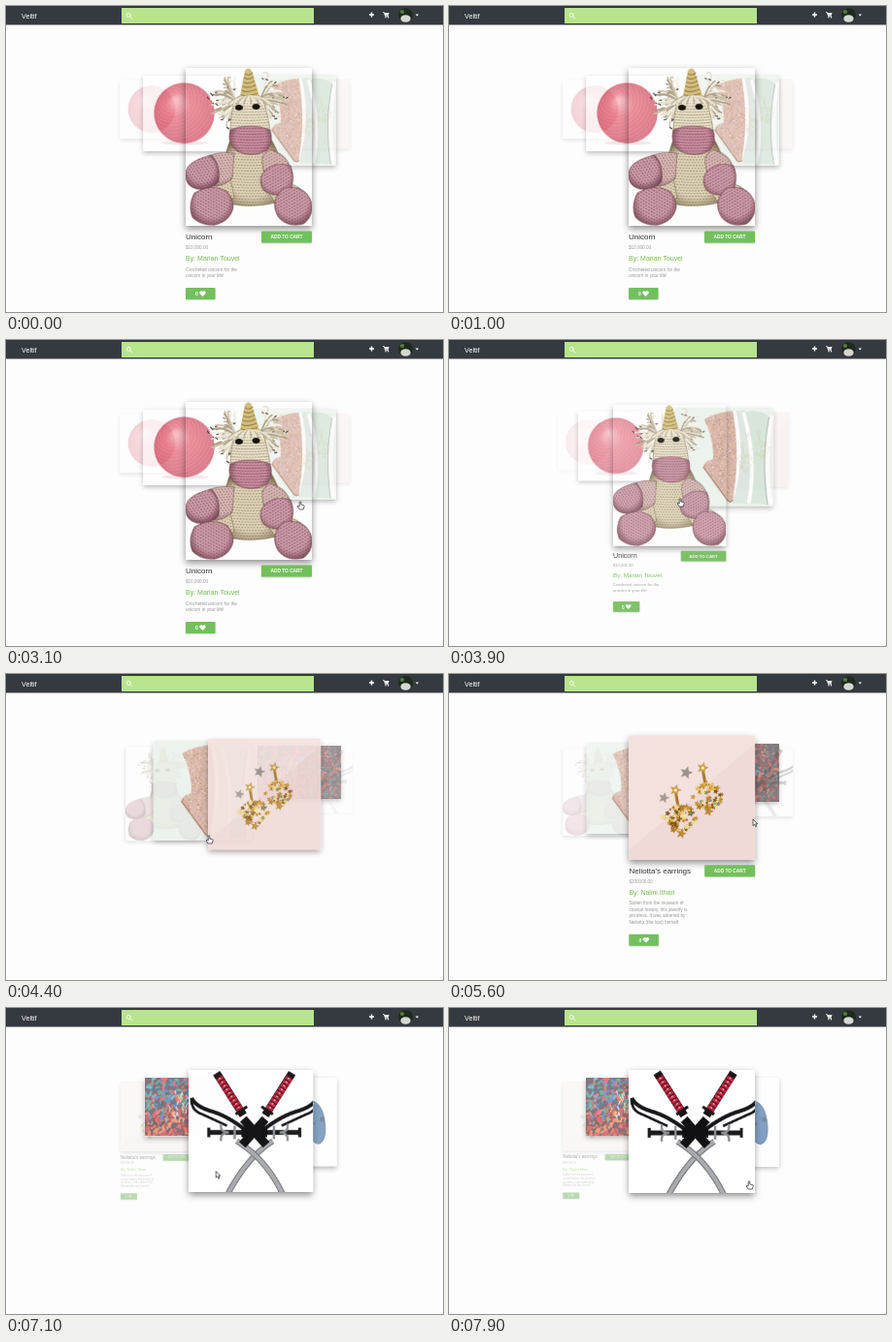
An HTML page with a canvas that plays this animation: 450x316 px, repeating every 8 s.

```html
<!DOCTYPE html>
<html lang="en">
<head>
<meta charset="utf-8">
<title>Shop carousel</title>
<style>
  html, body { margin: 0; width: 100%; height: 100%; overflow: hidden; background: #fdfdfd; }
  canvas { display: block; width: 450px; height: 316px; }
</style>
</head>
<body>
<canvas id="stage" width="450" height="316"></canvas>
<script>
const LOOP = 8000, W = 130, RES = 3;
const FONT = '"Liberation Sans", Arial, sans-serif';
const GREEN = '#72c05c';
const ctx = document.getElementById('stage').getContext('2d');
ctx.imageSmoothingQuality = 'high';

const clamp = (v, a = 0, b = 1) => Math.min(b, Math.max(a, v));
const ramp = (t, a, b) => clamp((t - a) / (b - a));
const smooth = k => k * k * (3 - 2 * k);

function seeded(seed) {
  return () => (seed = (seed * 16807) % 2147483647) / 2147483647;
}

// ---------- drawing helpers ----------
function oval(c, x, y, rx, ry, fill) {
  c.fillStyle = fill;
  c.beginPath();
  c.ellipse(x, y, rx, ry, 0, 0, 7);
  c.fill();
}

function shape(c, d, fill) {
  c.fillStyle = fill;
  c.fill(new Path2D(d));
}

function stroke(c, d, color, width) {
  c.strokeStyle = color;
  c.lineWidth = width;
  c.stroke(new Path2D(d));
}

function text(c, str, x, y, size, color, weight = '') {
  c.font = `${weight} ${size}px ${FONT}`;
  c.fillStyle = color;
  c.fillText(str, x, y);
}

function star(c, x, y, r, fill) {
  c.fillStyle = fill;
  c.beginPath();
  for (let i = 0; i < 10; i++) {
    const a = i * Math.PI / 5 - 1.3, q = i % 2 ? r * 0.45 : r;
    c.lineTo(x + q * Math.cos(a), y + q * Math.sin(a));
  }
  c.fill();
}

// Crocheted part: outline d, lit around (x, y), rows of stitches tilted by rot
function knit(c, d, x, y, r, base, dark, rot = 0) {
  c.save();
  c.clip(new Path2D(d));
  const g = c.createRadialGradient(x, y - r * 0.25, r * 0.1, x, y, r);
  g.addColorStop(0, base);
  g.addColorStop(0.6, base);
  g.addColorStop(1, dark);
  shape(c, d, g);
  c.translate(x, y);
  c.rotate(rot);
  c.setLineDash([1.7, 1.4]);
  c.strokeStyle = dark;
  c.lineWidth = 1;
  c.globalAlpha = 0.65;
  for (let v = -50, n = 0; v < 50; v += 2.9, n++) {
    c.lineDashOffset = n * 1.5;
    c.beginPath();
    c.moveTo(-50, v - 5);
    c.quadraticCurveTo(0, v + 7, 50, v - 5);
    c.stroke();
  }
  c.restore();
  c.globalAlpha = 0.6;
  stroke(c, d, dark, 1);
  c.globalAlpha = 1;
}

// ---------- pictures, in units of a 130 wide card ----------
function ball(c, h) {
  c.fillStyle = '#fff';
  c.fillRect(0, 0, W, h);
  oval(c, 60, 97, 34, 3, '#e8dcdc');
  const g = c.createRadialGradient(46, 36, 3, 59, 54, 44);
  g.addColorStop(0, '#f2939d');
  g.addColorStop(0.35, '#e0435a');
  g.addColorStop(1, '#c4253f');
  oval(c, 59, 54, 43.5, 43.5, g);
  c.save();
  c.beginPath();
  c.arc(59, 54, 43.5, 0, 7);
  c.clip();
  for (let r = 8; r < 90; r += 5) {
    c.strokeStyle = 'rgba(255,215,220,.2)';
    c.lineWidth = 0.8;
    c.beginPath();
    c.arc(42, 34, r, 0, 7);
    c.stroke();
  }
  c.restore();
}

function mane(c, x, y, dir, rnd) {
  c.lineCap = 'round';
  for (let i = 0; i < 85; i++) {
    const a = -1.5 + rnd() * 2.8, l = 12 + rnd() * 16;
    const ex = x + dir * Math.cos(a) * l, ey = y + Math.sin(a) * l;
    const tint = ['#e6decd', '#cbbfa7', '#f5f1e5', '#aa9d86'][i % 4];
    stroke(c, `M${x} ${y}Q${x + dir * l * 0.5} ${ey - 4} ${ex} ${ey}`, tint, 1.6);
    if (i % 5 == 0) stroke(c, `M${ex} ${ey}l${dir * 2} ${1.5 - rnd() * 4}`, '#35312c', 1);
  }
}

function unicorn(c) {
  const rnd = seeded(77);
  const cream = ['#dcd2b3', '#7f6d50'], pink = ['#cb98a5', '#72434f'], blush = ['#d5b5b1', '#7d575a'];
  knit(c, 'M46 74Q39 92 38 112Q36 134 46 140Q66 145 93 139Q104 122 100 102Q95 85 87 72Z', 68, 112, 40, ...cream);
  knit(c, 'M46 113Q28 116 14 124Q20 134 42 140L50 134Z', 36, 124, 24, ...cream, 0.4);
  knit(c, 'M92 116Q112 118 122 128Q112 140 94 142L86 130Z', 102, 126, 24, ...cream, -0.4);
  knit(c, 'M50 88Q32 86 22 92L20 122Q38 124 48 114Z', 35, 102, 25, ...blush, 1);
  knit(c, 'M26 90Q2 96 0 108Q-1 122 12 125Q28 125 34 117Q36 98 26 90Z', 16, 106, 21, ...pink, 0.9);
  knit(c, 'M85 84Q104 88 108 104L88 118Q77 106 79 92Z', 92, 99, 22, ...blush, -0.5);
  knit(c, 'M80 108Q90 96 108 101Q114 116 106 128Q92 135 80 126Q74 116 80 108Z', 93, 114, 22, ...pink, -0.5);
  knit(c, 'M42 127Q27 119 9 129Q2 142 7 154Q16 163 30 162Q46 158 49 144Q49 134 42 127Z', 27, 140, 26, ...pink, 0.5);
  knit(c, 'M101 124Q122 120 129 137Q133 152 121 161Q104 165 95 153Q86 137 101 124Z', 110, 140, 25, ...pink, -0.5);
  mane(c, 52, 36, -1, rnd);
  mane(c, 77, 32, 1, rnd);
  knit(c, 'M51 32Q64 22 78 30Q85 46 87 66Q78 86 62 86Q44 80 46 62Q47 44 51 32Z', 65, 54, 40, '#e8e0c8', '#8d7c5e');
  shape(c, 'M61 3Q65 -2 68 3L76 29Q66 35 56 29Z', '#d2bd7c');
  for (let i = 0; i < 6; i++) {
    stroke(c, `M${61 - i * 0.8} ${6 + i * 4.3}q5 3 ${8 + i * 1.7} -1`, '#917b42', 1);
  }
  for (let i = 0; i < 18; i++) {
    stroke(c, `M66 29q${i * 2 - 17} 1 ${i * 2.6 - 22} ${6 + rnd() * 7}`, i % 3 ? '#efe8d7' : '#bdb199', 1.4);
  }
  knit(c, 'M46 64Q66 56 87 64Q91 78 82 86Q68 93 53 86Q42 77 46 64Z', 67, 74, 24, '#c98d9d', '#7c4a59');
  oval(c, 55, 41, 4, 3, '#17130f');
  oval(c, 72.5, 40, 4, 3, '#17130f');
}

function shoes(c, h) {
  const rnd = seeded(9);
  c.fillStyle = '#e6efe7';
  c.fillRect(0, 0, W, h);
  shape(c, 'M74 4L92 3Q104 62 96 127L66 126Q88 70 74 4Z', '#d3e0d6');
  stroke(c, 'M77 4Q92 66 72 126', '#fdfdfc', 6);
  shape(c, 'M88 8Q105 -2 125 12Q114 70 123 128L94 126Q106 70 88 8Z', '#cbdfd0');
  stroke(c, 'M90 6Q108 68 97 126', '#fcfdfc', 5);
  stroke(c, 'M127 10Q117 70 126 128', '#fcfdfc', 6);
  stroke(c, 'M124 12Q113 70 122 128', '#8ea496', 1.2);
  const wedge = 'M38 15Q58 5 76 4Q86 60 76 122Q72 128 66 118L37 78Q39 70 50 68Q52 44 38 15Z';
  shape(c, wedge, '#cfa08d');
  c.save();
  c.clip(new Path2D(wedge));
  for (let i = 0; i < 600; i++) {
    c.fillStyle = ['#a8705c', '#eccfc2', '#c28c50', '#a98488'][i % 4];
    c.fillRect(36 + rnd() * 50, rnd() * 128, 1.5, 1.5);
  }
  c.restore();
  stroke(c, 'M76 122Q72 128 66 118L37 78', '#96644a', 1.8);
}

function cluster(c, x, y, rnd) {
  const gold = ['#b27c25', '#e3bd63', '#82571b', '#f3dc98', '#c9983a'];
  stroke(c, `M${x - 5} ${y - 28}l3 18`, '#a9772a', 3);
  for (let i = 0; i < 75; i++) {
    const dy = (rnd() - 0.5) * 25, dx = (rnd() - 0.5) * 2 * (20 - Math.abs(dy));
    star(c, x + dx, y + dy, 1.6 + rnd() * 2.4, gold[i % 5]);
    if (i % 8 == 0) oval(c, x + dx, y + dy, 1.3, 1.3, i % 16 ? '#5d9b94' : '#cc6d55');
  }
  star(c, x + 1, y + 16, 5.5, '#b98a38');
  star(c, x - 5, y - 29, 6.5, '#c99d46');
  oval(c, x - 5, y - 29, 1.6, 1.6, '#fff0bc');
}

function earrings(c, h) {
  const rnd = seeded(41);
  c.fillStyle = '#efdad7';
  c.fillRect(0, 0, W, h);
  shape(c, `M0 0H${W}V8L0 ${h - 10}Z`, '#f3e1de');
  star(c, 59, 38, 7, '#9d918b');
  star(c, 36, 64, 6, '#a59993');
  cluster(c, 81, 62, rnd);
  cluster(c, 53, 85, rnd);
}

function painting(c, h) {
  const rnd = seeded(1234);
  const red = ['#c81f2b', '#e8352f', '#8d1420', '#e96a35', '#3a1722'];
  const blue = ['#1f63a8', '#3f9ccb', '#16345c', '#2f7f62', '#d43038'];
  const dusk = ['#4a1a20', '#2c2328', '#8f2627', '#36504f', '#b0482f'];
  c.fillStyle = '#35202a';
  c.fillRect(0, 0, W, h);
  c.lineCap = 'round';
  for (let i = 0; i < 700; i++) {
    const x = rnd() * W, y = rnd() * h, edge = rnd() * 34;
    const tones = x > 66 + edge ? dusk : y + x * 0.3 > 36 + edge ? red : blue;
    stroke(c, `M${x} ${y}l${rnd() * 10 - 5} ${rnd() * 9 - 2}`, tones[Math.floor(rnd() * 5)], 1.5 + rnd() * 3);
  }
  for (let i = 0; i < 26; i++) {
    stroke(c, `M${34 + rnd() * 28} ${18 + rnd() * 42}l${rnd() * 6 - 3} 5`, i % 2 ? '#e6c452' : '#cfe3ea', 1.5);
  }
}

function swordSide(c) {
  c.lineCap = 'butt';
  stroke(c, 'M3 29Q7 38 24 43T60 63', '#17171a', 4);
  stroke(c, 'M3 29Q2 42 14 46L40 58', '#17171a', 2.6);
  stroke(c, 'M20 65H64', '#1a1a1c', 5);
  stroke(c, 'M21 60v10', '#1a1a1c', 3);
  stroke(c, 'M34 56Q32 65 42 65Q32 66 34 74M48 58v14', '#8d8f93', 2.4);
  stroke(c, 'M29 3L57 47', '#1b1416', 8.5);
  stroke(c, 'M31 7L54 42', '#c3273f', 7.5);
  c.setLineDash([1.5, 3]);
  stroke(c, 'M31 7L54 42', '#5d0f20', 7);
  stroke(c, 'M32 8L54 42', '#f1a3ae', 2.2);
  c.setLineDash([]);
  stroke(c, 'M49 46L61 38', '#19191b', 3);
}

function swords(c, h) {
  c.fillStyle = '#fff';
  c.fillRect(0, 0, W, h);
  for (const d of ['M88 74Q62 90 41 129', 'M50 74Q80 92 98 129']) {
    stroke(c, d, '#6f7174', 6);
    stroke(c, d, '#a9abae', 4);
  }
  swordSide(c);
  c.save();
  c.translate(137, 0);
  c.scale(-1, 1);
  swordSide(c);
  c.restore();
  stroke(c, 'M57 51L81 78M80 51L56 78', '#111113', 9);
  stroke(c, 'M55 65H82', '#111113', 10);
}

function gadget(c, h) {
  c.fillStyle = '#fff';
  c.fillRect(0, 0, W, h);
  const body = 'M40 36Q66 22 94 34Q108 38 112 62Q116 92 103 96Q92 94 86 76H48Q40 96 28 94Q18 88 25 56Q29 38 40 36Z';
  shape(c, body, '#2f639a');
  c.save();
  c.clip(new Path2D(body));
  const rnd = seeded(5);
  for (let i = 0; i < 30; i++) {
    oval(c, 20 + rnd() * 95, 30 + rnd() * 65, 2 + rnd() * 5, 2 + rnd() * 4,
      ['#1c3d66', '#4d90c2', '#9a5230', '#213955'][i % 4]);
  }
  c.restore();
  stroke(c, body, '#244a70', 1.5);
}

function item(pos, h, draw, info) {
  const pic = document.createElement('canvas');
  pic.width = W * RES;
  pic.height = h * RES;
  const c = pic.getContext('2d');
  c.scale(RES, RES);
  draw(c, h);
  return { pos, h, pic, info };
}

const items = [
  item(-2, 109, ball),
  item(-1, 109, ball),
  item(0, 163, unicorn, {
    title: 'Unicorn', price: '$10,000.00', by: 'By: Marian Touvel',
    lines: ['Crocheted unicorn for the', 'unicorn in your life!'],
    alpha: (t, a) => a * (1 - ramp(t, 3950, 4400))
  }),
  item(1, 130, shoes),
  item(2, 128, earrings, {
    title: "Neliotta's earrings", price: '$200000.00', by: 'By: Nalini Ithari',
    lines: ['Stolen from the museum of', 'coastal history, this jewelry is',
      'priceless. It was adorned by', 'Neliotta (the last) herself'],
    alpha: (t, a) => Math.max(a, 0.4) * ramp(t, 4850, 5050)
  }),
  item(3, 84, painting),
  item(4, 127, swords),
  item(5, 129, gadget)
];

// ---------- carousel ----------
// A short drag, then an exponential glide over two places
function swipe(t, start) {
  const held = 0.2875;
  if (t < start) return 0;
  if (t < start + 200) return held * ((t - start) / 200) ** 1.5;
  return 2 - (2 - held) * Math.exp(-(t - start - 200) / 287);
}

function heart(x, y, r) {
  shape(ctx, `M${x} ${y + r}L${x - r} ${y}A${r * 0.54} ${r * 0.54} 0 0 1 ${x} ${y - r * 0.5}` +
    `A${r * 0.54} ${r * 0.54} 0 0 1 ${x + r} ${y}Z`, '#fff');
}

function button(x, y, w, h) {
  ctx.save();
  ctx.shadowColor = 'rgba(0,0,0,.2)';
  ctx.shadowBlur = 1.5;
  ctx.shadowOffsetY = 0.7;
  ctx.fillStyle = GREEN;
  ctx.beginPath();
  ctx.roundRect(x, y, w, h, 0.8);
  ctx.fill();
  ctx.restore();
}

function details(info, h) {
  text(ctx, info.title, 0, h + 14, 8, '#333');
  text(ctx, info.price, 0, h + 24, 4.6, '#9a9a9a');
  text(ctx, info.by, 0, h + 36, 7, '#6fbb4b');
  info.lines.forEach((s, i) => text(ctx, s, 0, h + 46.5 + i * 6.5, 4.7, '#969696'));
  button(78, h + 5.5, 52, 12);
  ctx.textAlign = 'center';
  text(ctx, 'ADD TO CART', 104, h + 13.3, 4.8, '#fff', 'bold');
  ctx.textAlign = 'left';
  const y = h + 51 + info.lines.length * 6.5;
  button(0, y, 30.5, 12);
  text(ctx, '0', 10, y + 8.4, 5, '#fff', 'bold');
  heart(17.5, y + 5.8, 3.1);
}

function card(it, u, t) {
  const alpha = clamp(1 - 0.4 * Math.abs(u));
  if (alpha < 0.01) return;
  const s = 500 / (500 + 200 * Math.abs(u));
  ctx.save();
  ctx.translate(217.5 + (32.5 + 74 * u) * s - W * s / 2, 92 - 28 * s);
  ctx.scale(s, s);
  ctx.globalAlpha = alpha;

  // Shadow outside the box only, as see-through pictures need
  ctx.save();
  ctx.beginPath();
  ctx.rect(-40, -40, W + 80, it.h + 80);
  ctx.rect(0, 0, W, it.h);
  ctx.clip('evenodd');
  ctx.shadowColor = 'rgba(0,0,0,.45)';
  ctx.shadowBlur = 7 * s;
  ctx.shadowOffsetY = 3 * s;
  ctx.fillRect(0, 0, W, it.h);
  ctx.restore();

  ctx.drawImage(it.pic, 0, 0, W, it.h);
  if (it.info) {
    ctx.globalAlpha = it.info.alpha(t, alpha);
    if (ctx.globalAlpha > 0) details(it.info, it.h);
  }
  ctx.restore();
}

// ---------- header ----------
function header() {
  ctx.fillStyle = '#343a3f';
  ctx.fillRect(0, 0, 450, 19);
  ctx.fillStyle = 'rgba(40,44,48,.45)';
  ctx.fillRect(0, 19, 450, 1);
  text(ctx, 'Veltif', 16, 13, 7.2, '#fff');
  ctx.fillStyle = '#b7e48d';
  ctx.fillRect(119, 2, 198, 16);
  ctx.lineCap = 'round';
  stroke(ctx, 'M128.3 9.4a2 2 0 1 1-4 0a2 2 0 1 1 4 0M128 11l2 2', '#f5fbef', 1);
  ctx.lineCap = 'butt';
  stroke(ctx, 'M374 9h5M376.5 6.5v5', '#fff', 1.5);
  stroke(ctx, 'M388 6.6h1.4l1.2 4h3.4', '#fff', 0.8);
  shape(ctx, 'M389.6 7h4.9l-.8 2.8h-3.3Z', '#fff');
  oval(ctx, 391, 11.8, 0.7, 0.7, '#fff');
  oval(ctx, 393.6, 11.8, 0.7, 0.7, '#fff');
  oval(ctx, 411.5, 9.5, 7.3, 7.3, '#1d2a1c');
  oval(ctx, 408, 6, 2.2, 2, '#557a3c');
  oval(ctx, 411.5, 13, 5.2, 3.8, '#d5d8d2');
  shape(ctx, 'M421.6 8.6h3.4l-1.7 1.9Z', '#fff');
}

// ---------- pointer ----------
const path = [
  [1600, 345, 0], [2050, 303, 167], [3100, 303, 167], [3600, 280, 165], [3700, 280, 165],
  [3900, 238, 164], [4100, 209, 167], [4600, 209, 167], [5200, 313, 150], [5800, 313, 150],
  [6000, 271, 155], [6300, 193, 166], [6900, 193, 166], [7600, 309, 179], [8000, 309, 179]
];

function pointer(t) {
  if (t < path[0][0]) return;
  const i = path.findIndex(p => p[0] > t);
  const [t0, x0, y0] = path[i - 1], [t1, x1, y1] = path[i];
  const k = smooth(ramp(t, t0, t1));
  const hand = t > 1950 && t < 4700 || t > 7450;
  ctx.save();
  ctx.translate(x0 + (x1 - x0) * k, y0 + (y1 - y0) * k);
  const d = hand
    ? 'M-.8 .2Q0 -.7 .8 .2V3L3.5 3.6Q4.3 4 4 5.5L3.2 8H-.8L-2.8 5Q-2.5 3.8 -1.6 4.5L-.8 5.2Z'
    : 'M0 0V6.6L1.5 5.2L2.6 7.7L3.7 7.2L2.6 4.8H4.6Z';
  shape(ctx, d, '#fff');
  stroke(ctx, d, '#222', 0.7);
  ctx.restore();
}

function render(t) {
  ctx.fillStyle = '#fdfdfd';
  ctx.fillRect(0, 0, 450, 316);
  const p = swipe(t, 3700) + swipe(t, 5800);
  items.map(it => ({ it, u: it.pos - p }))
    .sort((a, b) => Math.abs(b.u) - Math.abs(a.u))
    .forEach(({ it, u }) => card(it, u, t));
  header();
  pointer(t);
}

const began = performance.now();
function tick() {
  render((performance.now() - began) % LOOP);
  requestAnimationFrame(tick);
}
tick();
</script>
</body>
</html>
```
